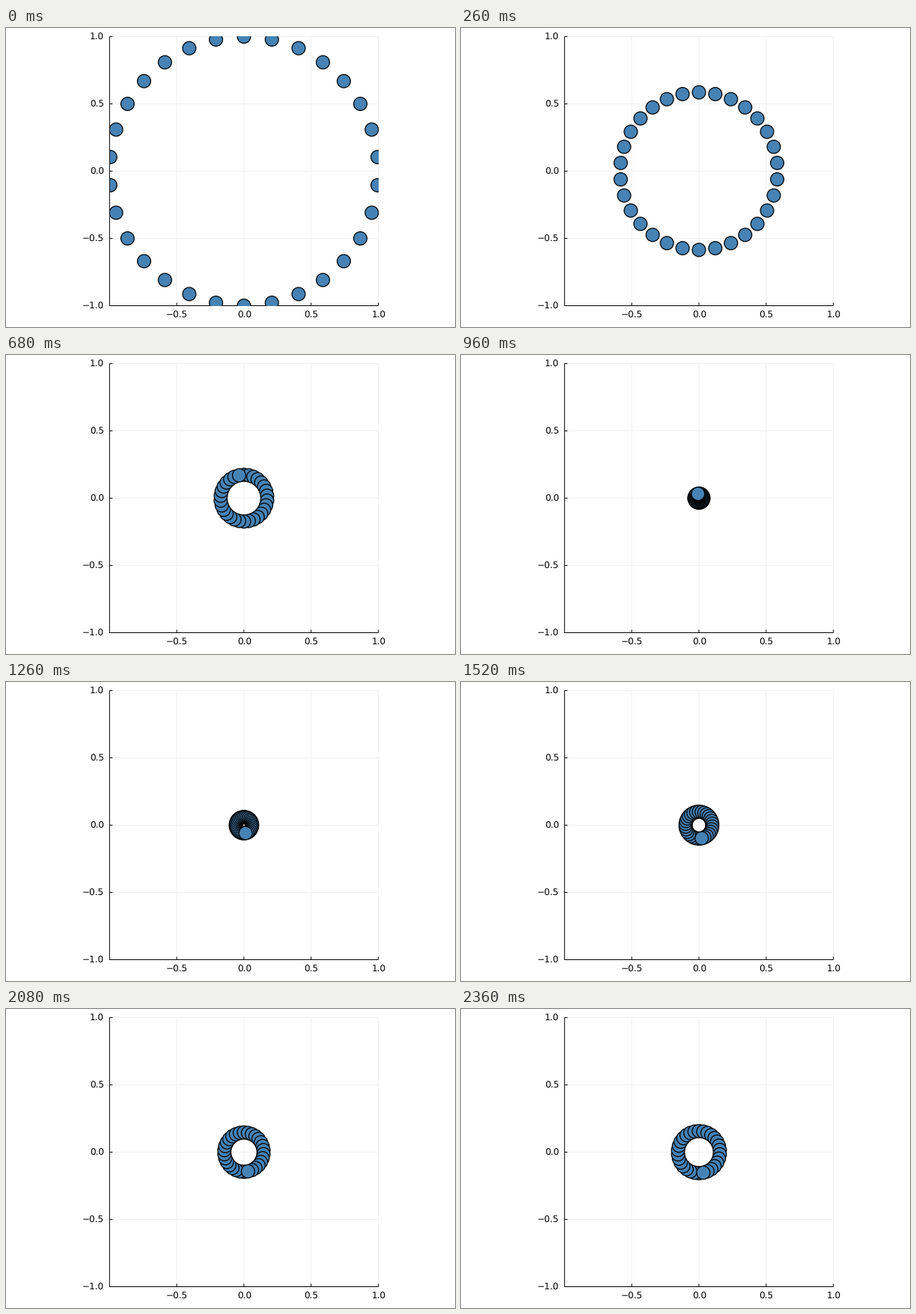
A matplotlib script that plays this animation: 600x400 px, repeating every 2460 ms.

```python
import math

import matplotlib.pyplot as plt
from matplotlib.animation import FuncAnimation
from matplotlib.patches import Circle, Rectangle

W, H, DPI = 600, 400, 100
PX = 72 / DPI                       # one pixel in points
CX, CY = 317.95, 191.5              # data origin on the stage
UX, UY = 179.6, 180                 # pixels per data unit
DOTS, DOT_R = 30, 8.9
LIMIT, DECAY = -0.171, 0.0874       # the ring radius settles at LIMIT
STEPS, TICK = 51, 20
TICKS = 2460 // TICK

plt.rcParams["font.family"] = "DejaVu Sans"
plt.rcParams["text.hinting"] = "none"
fig = plt.figure(figsize=(W / DPI, H / DPI), dpi=DPI, facecolor="white")
ax = fig.add_axes([0, 0, 1, 1])
ax.set_xlim(0, W)
ax.set_ylim(H, 0)
ax.axis("off")


def to_px(x, y):
    return CX + UX * x, CY - UY * y


def line(p, q, **style):
    ax.plot([p[0], q[0]], [p[1], q[1]], solid_capstyle="butt",
            snap=False, **style)


def label(x, y, value, align):
    text = f"{value:.1f}".replace("-", "\u2212")
    ax.text(x, y, text, fontsize=12 * PX, ha=align, va="baseline", color="black")


left, top = to_px(-1, 1)
right, bottom = to_px(1, -1)
grid = dict(color="#f0f0f0", lw=PX, zorder=1)
ink = dict(color="black", lw=PX, zorder=2)

for v in (-1, -0.5, 0, 0.5, 1):
    x, y = to_px(v, v)
    if v > -1:
        line((x, top), (x, bottom), **grid)
        line((x, bottom), (x, bottom - 4), **ink)
        label(x + 0.3, 387.8, v, "center")
    line((left, y), (right, y), **grid)
    line((left, y), (left + 4, y), **ink)
    label(131, y + 4.4, v, "right")

line((left, top), (left, bottom + 0.5), **ink)
line((left, bottom), (right, bottom), **ink)

# Dots may cover the bottom axis but not the left one.
view = Rectangle((left + 0.5, top - 0.5), right - left - 0.5, bottom - top + 1,
                 transform=ax.transData)
dots = []
for i in range(DOTS):
    dot = Circle((CX, CY), DOT_R, fc="steelblue", ec="black",
                 lw=1.25 * PX, zorder=3 + i)
    ax.add_patch(dot)
    dot.set_clip_path(view)
    dots.append(dot)


def step_at(tick):
    """Steps come in threes: two short ones, then one held for 100 ms."""
    group, offset = divmod(tick + 1, 7)
    return min(3 * group + min(offset, 2) - 1, STEPS - 1)


def update(tick):
    r = LIMIT + (1 - LIMIT) * math.exp(-DECAY * step_at(tick))
    for i, dot in enumerate(dots):
        a = 2 * math.pi * i / DOTS
        dot.center = to_px(r * math.sin(a), r * math.cos(a))
    return dots


anim = FuncAnimation(fig, update, frames=TICKS, interval=TICK,
                     repeat=True, repeat_delay=0, blit=False)
plt.show()
```
